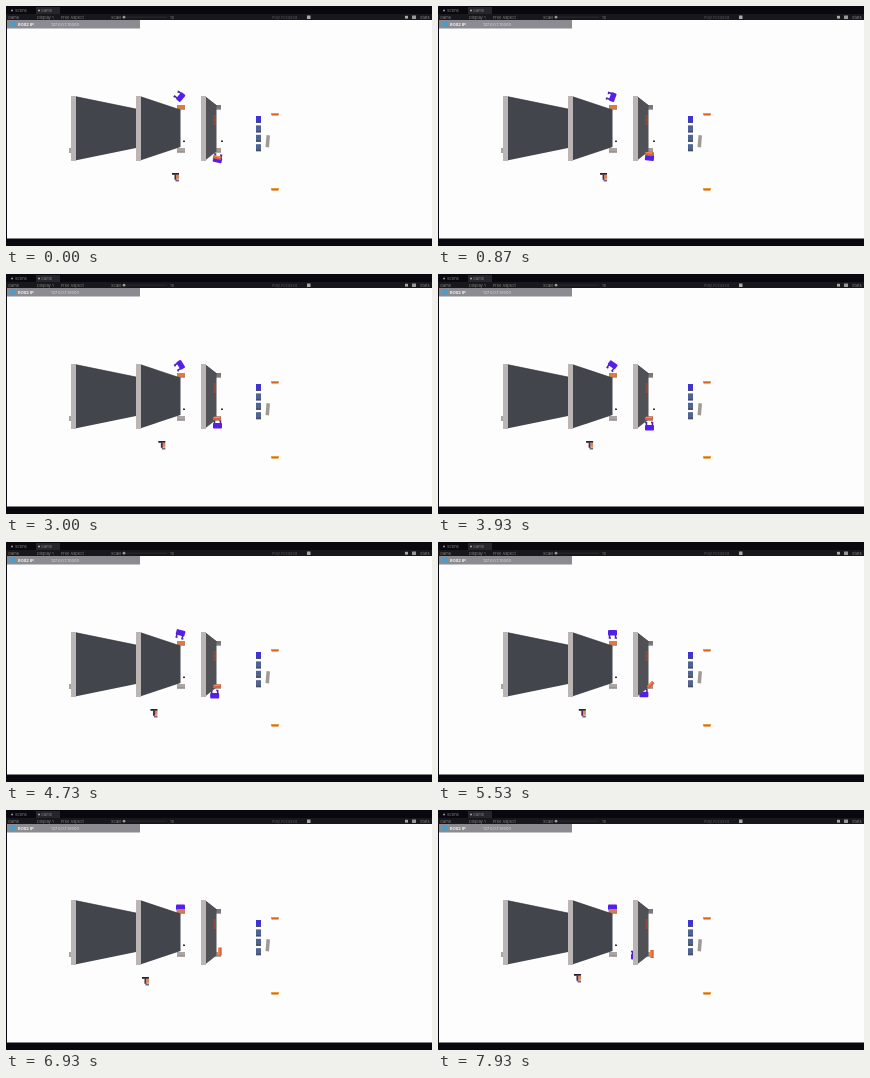
Animation of 426x240 px, one loop 8 s. Source, as an HTML page:

```html
<!DOCTYPE html>
<html lang="en">
<head>
<meta charset="utf-8">
<title>Robot simulation</title>
<style>
  html, body { margin: 0; width: 100%; height: 100%; overflow: hidden; background: #08080e; }
  svg { display: block; width: 100vw; height: 100vh; }
  text { font-family: Inter, Roboto, sans-serif; font-size: 4px; fill: #858585; }
</style>
</head>
<body>
<svg viewBox="0 0 426 240">
  <defs>
    <g id="robot">
      <rect x="-4.5" y="-3" width="9" height="5.5" rx="1" fill="#5420e8"/>
      <path d="M-3 2V5H-1.5M3 2V5H4.5" fill="none" stroke="#4424a8" stroke-width="1.5"/>
    </g>
  </defs>

  <rect width="426" height="240" fill="#08080e"/>
  <rect x="1" y="14" width="425" height="218.5" fill="#fdfdfd"/>

  <!-- Editor tabs and toolbar -->
  <rect x="30" y="1" width="24" height="7" fill="#25252b"/>
  <rect y="8" width="426" height="6" fill="#17171c"/>
  <circle cx="6" cy="4.5" r="1" fill="#999"/>
  <text x="9" y="6">Scene</text>
  <circle cx="33" cy="4.5" r="1" fill="#aaa"/>
  <text x="35" y="6">Game</text>
  <text x="2" y="12.6">Game</text>
  <text x="31" y="12.6">Display 1</text>
  <text x="55" y="12.6">Free Aspect</text>
  <text x="105" y="12.6">Scale</text>
  <circle cx="118" cy="11.2" r="1.4" fill="#999"/>
  <path d="M120 11.2H161" stroke="#38383e" stroke-width=".6"/>
  <text x="164" y="12.6">1x</text>
  <text x="266" y="12.6" style="fill:#55555b">Play Focused</text>
  <rect x="301" y="9.5" width="3.5" height="3.5" fill="#aaa"/>
  <rect x="399" y="9.8" width="3" height="2.8" fill="#aaa"/>
  <rect x="406" y="9.5" width="4" height="3.5" fill="#999"/>
  <text x="414" y="12.6">Stats</text>

  <!-- Connection status -->
  <rect x="1" y="14" width="133" height="8.5" fill="#8c8b92"/>
  <rect x="4" y="15.5" width="6" height="5" fill="#4f9bc4"/>
  <text x="12" y="19.8" style="fill:#f5f5f5;font-weight:700">ROS2 IP:</text>
  <text x="45" y="19.6" style="fill:#dadada">127.0.0.1:10000</text>

  <use id="upper" href="#robot"/>
  <use id="lower" href="#robot"/>
  <g id="scene"></g>
  <g id="load">
    <rect x="-4" y="-1.7" width="8" height="3.4" fill="#e0603c"/>
    <rect x="-3" y="-1.7" width="6" height="1.2" fill="#e8984c"/>
  </g>

  <g id="walker">
    <rect x="-3.5" y="-4" width="7" height="1.8" fill="#29202c"/>
    <rect x="-1" y="-2.2" width="2" height="5" fill="#4a2850"/>
    <rect x="1" y="-2.2" width="2.5" height="4" fill="#e88050"/>
    <rect x="0" y="2.5" width="3.5" height="2" fill="#75687c"/>
  </g>
</svg>
<script>
const LOOP = 8, FPS = 15;
const $ = id => document.getElementById(id);

function add(tag, attrs) {
  const node = document.createElementNS('http://www.w3.org/2000/svg', tag);
  for (const name in attrs) node.setAttribute(name, attrs[name]);
  return $('scene').appendChild(node);
}
const box = (x, y, width, height, fill) => add('rect', { x, y, width, height, fill });

function crate(x, y, color) {
  box(x, y, 8, 4.7, '#8c8583');
  box(x, y, 8, 3.5, color);
}

// The side panel narrows towards its far edge.
function wall(x, depth, inset, color) {
  const edge = `M${x + 4} 90.5L${x + depth} ${90.5 + inset}`;
  add('path', { d: `${edge}V${154.5 - inset}L${x + 4} 154.5Z`, fill: color });
  add('path', { d: edge, stroke: '#25252b', 'stroke-width': 0.6 });
  box(x, 90, 5, 65, '#bbb5b5');
}

box(63, 142, 3, 5, '#a5a5a8');
crate(171, 99, '#e27a3c');
crate(171, 142, '#aaa5a2');
crate(207, 99, '#77777b');
crate(207, 142, '#a89a94');
wall(65, 65, 12.5, '#43454d');
wall(130, 44.5, 13.5, '#43454d');
wall(195, 15.5, 9, '#505057');
box(207.5, 109, 2.5, 10, '#8b4b3a');
box(177, 134.5, 2, 1.5, '#33333a');
const rightDot = box(215, 134.5, 2, 1.5, '#33333a');

for (let i = 0; i < 4; i++) {
  const y = 110 + i * 9.4;
  box(250, y, 5, 7, i ? '#4f6396' : '#3c34d8');
  box(250, y + 5.5, 5, 1.5, '#45505c');
}
add('path', { d: 'M260.5 129L264 129.5 263 141.5 259.5 141Z', fill: '#a09a96' });
for (const y of [107, 182]) {
  box(265, y, 8, 2.5, '#e8a03c');
  box(266, y + 1, 6, 1.3, '#d8602c');
}

function ease(time, start, end) {
  const p = Math.min(1, Math.max(0, (time - start) / (end - start)));
  return p * p * (3 - 2 * p);
}

function place(id, x, y, angle = 0) {
  $(id).setAttribute('transform', `translate(${x} ${y}) rotate(${angle})`);
}

function draw(now) {
  const t = Math.floor(now / 1000 % LOOP * FPS + 0.05) / FPS;
  const settle = ease(t, 0, 1.7);
  const topple = ease(t, 4.5, 6.5);
  const bob = 2.3 * Math.cos(2 * Math.PI * Math.min(1, t / 3.93));

  place('walker', 169.5 - 4.55 * Math.min(t, 6.6), 171 - 3 * ease(t, 7, 7.9));
  place('upper', 174.5, 91 + 6.5 * ease(t, 5.5, 6.9), Math.max(0, 130 - 24 * t));
  place('lower', 211.5 - 3.5 * Math.max(0, t - 3.93),
    151.3 + bob - 7 * ease(t, 5, 7), 180 + 12 * (1 - settle));
  place('load', 211 + 3 * topple,
    151.5 - 7 * settle - 3 * topple + 2.5 * ease(t, 7, 7.9), 12 * (1 - settle) - 90 * topple);
  rightDot.setAttribute('visibility', t > 4.7 ? 'hidden' : 'visible');
  requestAnimationFrame(draw);
}
requestAnimationFrame(draw);
</script>
</body>
</html>
```
